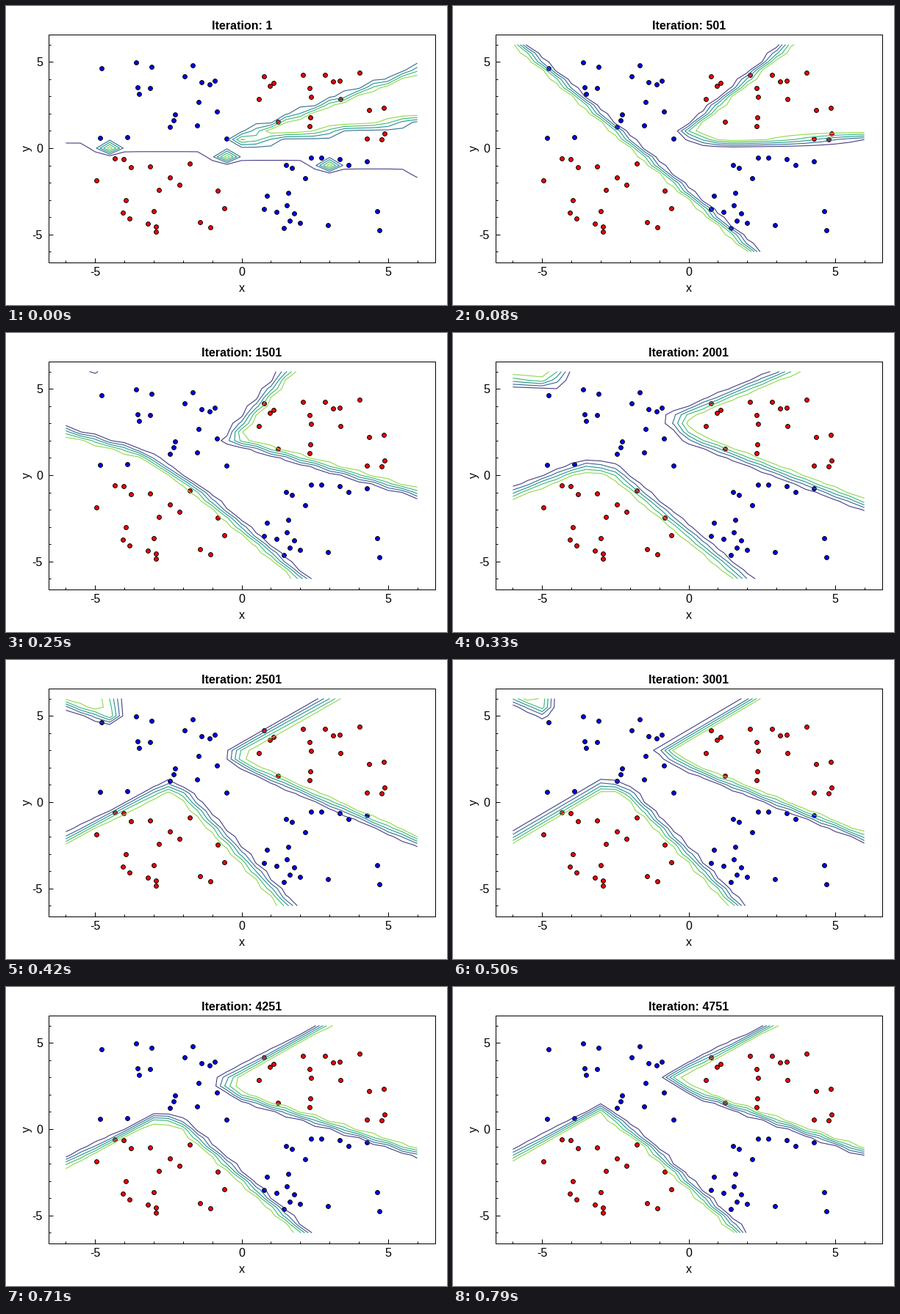
Animation, 600 px wide and 408 px high, one loop 0.83 s. Source, as a matplotlib script:

```python
import numpy as np
import matplotlib.pyplot as plt
from matplotlib.animation import FuncAnimation

W, H = 600, 408
PX = 0.72  # points per pixel at 100 dpi
LEFT, RIGHT, TOP, BOTTOM = 58, 584, 39, 350
X0, Y0, DX, DY = 321, 194.5, 39.85, 23.56  # data origin and unit in pixels
LEVELS = np.arange(1, 6) / 6
COLORS = plt.get_cmap("viridis")(LEVELS)
STEPS_PER_SECOND = 24

plt.rcParams["font.family"] = "Liberation Sans"
plt.rcParams["axes.unicode_minus"] = False

# The classifier output is sampled on a coarse grid, as its contours show
ticks = np.arange(-6, 6.5, 0.5)
gx, gy = np.meshgrid(X0 + DX * ticks, Y0 - DY * ticks)

# Each region is convex: the side to the right of a chain of points.
# One chain per key step; the steps between blend them.
KEY_STEPS = [0, 4, 8, 10, 14, 17, 19]
diagonal = [(92, 53), (200, 149), (305, 242), (410, 335)]
lower = [
    diagonal,
    diagonal,
    [(82, 219), (176, 182), (215, 185), (394, 335)],
    [(82, 244), (220, 172), (244, 183), (383, 335)],
    [(82, 241), (190, 168), (222, 166), (390, 335)],
    [(82, 240), (201, 180), (235, 182), (404, 335)],
    [(82, 230), (201, 165), (262, 212), (391, 335)],
]
upper = [
    [(560, 156), (320, 188), (309, 182), (560, 87)],
    [(560, 203), (430, 189), (311, 174), (311, 53)],
    [(560, 235), (322, 143), (299, 117), (453, 53)],
    [(560, 248), (330, 147), (304, 130), (441, 53)],
    [(560, 237), (325, 152), (264, 122), (374, 53)],
    [(560, 227), (322, 151), (291, 130), (433, 53)],
    [(560, 226), (330, 145), (296, 123), (433, 53)],
]
away = [(110, 20), (100, 30), (82, 20)]
corner = [
    away,
    away,
    [(147, 53), (135, 70), (82, 66)],
    [(145, 53), (151, 86), (82, 61)],
    [(112, 45), (101, 64), (82, 46)],
    away,
    away,
]
softness = [0.10, 0.07, 0.16, 0.13, 0.10, 0.10, 0.09]

# At the start: a faint haze above a line, and three peaks along it
haze_line = [(560, 231), (82, 190)]
peaks = [(-4.5, 0), (-0.5, -0.5), (3, -1)]

# The samples, one row of x, y pairs per quadrant
top_left = [130, 85, 177, 77, 198, 83, 179, 111, 181, 120, 196, 112, 254, 81,
            243, 96, 266, 104, 277, 107, 284, 102, 262, 131, 287, 144,
            230, 148, 228, 156, 223, 165, 260, 163, 128, 180, 165, 179,
            300, 181]
low_right = [381, 217, 389, 221, 407, 235, 355, 259, 384, 255, 351, 277,
             368, 281, 382, 272, 392, 283, 386, 293, 400, 296, 378, 303,
             438, 299, 505, 280, 508, 306, 415, 207, 429, 207, 454, 209,
             466, 217, 491, 212]
top_right = [351, 96, 359, 109, 364, 105, 344, 127, 404, 94, 434, 94,
             445, 103, 454, 102, 481, 91, 413, 112, 415, 124, 455, 127,
             494, 142, 514, 139, 370, 158, 414, 152, 413, 164, 491, 181,
             511, 182, 515, 174]
low_left = [148, 208, 160, 209, 170, 220, 196, 219, 123, 238, 250, 215,
            223, 234, 236, 244, 208, 251, 163, 265, 159, 282, 168, 290,
            201, 280, 193, 297, 204, 301, 204, 308, 264, 295, 278, 302,
            288, 252, 297, 276]


def blend(keys, step):
    """Value of a keyed quantity at a step."""
    k = min(np.searchsorted(KEY_STEPS, step, side="right"),
            len(KEY_STEPS) - 1)
    a, b = KEY_STEPS[k - 1], KEY_STEPS[k]
    t = (step - a) / (b - a)
    return (1 - t) * np.array(keys[k - 1]) + t * np.array(keys[k])


def region(chain, soft):
    """Soft membership, from 0 to 1, of every grid node."""
    inside = np.inf
    for (ax_, ay_), (bx, by) in zip(chain[:-1], chain[1:]):
        ux, uy = (bx - ax_) / DX, (by - ay_) / DY
        side = ux * (gy - ay_) / DY - uy * (gx - ax_) / DX
        inside = np.minimum(inside, side / np.hypot(ux, uy))
    return 0.5 + 0.5 * np.tanh(inside / (2 * soft))


def peak(x, y):
    u, v = (gx - X0) / DX, (Y0 - gy) / DY
    return 0.95 * np.exp(-((u - x) / 0.45) ** 2 - ((v - y) / 0.3) ** 2)


def field(step):
    soft = blend(softness, step)
    learned = min(1, step / 2)
    parts = [learned * region(blend(lower, step), soft),
             region(blend(upper, step), soft),
             region(blend(corner, step), soft),
             0.28 * (1 - learned) * region(haze_line, 0.01)]
    parts += [(1 - learned) * peak(x, y) for x, y in peaks]
    return np.max(parts, axis=0)


fig = plt.figure(figsize=(W / 100, H / 100), dpi=100, facecolor="white")
ax = fig.add_axes([0, 0, 1, 1])
ax.set_xlim(0.5, W + 0.5)
ax.set_ylim(H + 0.5, 0.5)
ax.axis("off")


def line(xs, ys):
    ax.plot(xs, ys, color="black", lw=PX, solid_capstyle="butt")


def label(x, y, s, ha="center", va="baseline", **kw):
    return ax.text(x, y, s, fontsize=16 * PX, ha=ha, va=va, **kw)


for xy, color in ((top_left, "#0000ff"), (low_right, "#0000ff"),
                  (top_right, "#ff0000"), (low_left, "#ff0000")):
    ax.plot(xy[::2], xy[1::2], "o", ms=5.8 * PX, mfc=color, mec="black",
            mew=PX, zorder=3)

line([LEFT, RIGHT, RIGHT, LEFT, LEFT], [TOP, TOP, BOTTOM, BOTTOM, TOP])
for v in range(-6, 7):
    x, y = X0 + DX * v, Y0 - DY * v
    size = 6 if v % 5 == 0 else 3
    line([x, x], [BOTTOM, BOTTOM - size])
    line([LEFT, LEFT + size], [y, y])
    if v % 5 == 0:
        label(x, 369, str(v))
        label(50.5, y + 5.8, str(v), ha="right")
label(X0, 391, "x")
label(28.5, Y0, "y", va="center", rotation=90)
title = label(X0 + 0.5, 32.5, "", weight="bold")

drawn = {}


def update(frame):
    step = (2 * frame + 1) * STEPS_PER_SECOND // 200
    if "curves" in drawn:
        drawn["curves"].remove()
    drawn["curves"] = ax.contour(gx, gy, field(step), levels=LEVELS,
                                 colors=COLORS, linewidths=1.1 * PX, zorder=4)
    title.set_text(f"Iteration: {250 * step + 1}")
    return [title]


anim = FuncAnimation(fig, update, frames=83, interval=10, repeat=True,
                     repeat_delay=0, blit=False)
plt.show()
```
